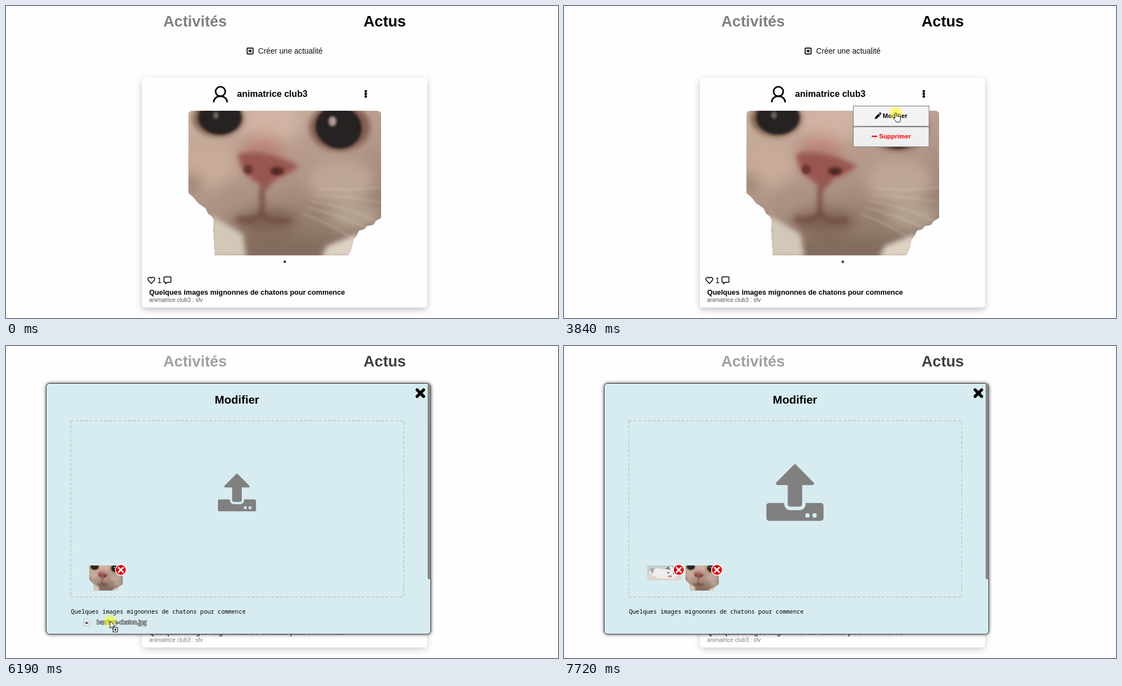
An HTML page for the animation above (8000 ms loop, 995 px wide and 563 px high).

```html
<!DOCTYPE html>
<html lang="fr">
<head>
<meta charset="utf-8">
<title>Actus</title>
<style>
html, body { margin: 0; width: 100%; height: 100%; overflow: hidden; background: #fefefe; }
svg { display: block; width: 100%; height: 100%; font-family: "Liberation Sans", Arial, sans-serif; }
.b { font-weight: bold; }
.line { fill: none; stroke: #000; }
.mono { font: 10.5px "Noto Sans Mono", monospace; }
.file { font: 10px "Open Sans", sans-serif; fill: #e8e8e8; stroke: #333; stroke-width: 1.6; paint-order: stroke; }
</style>
</head>
<body>
<svg viewBox="0 0 995 563">
<defs>
  <linearGradient id="skin" x1="0.1" y1="0" x2="0.55" y2="1">
    <stop offset="0" stop-color="#cbb09f"/><stop offset=".5" stop-color="#b2978a"/><stop offset="1" stop-color="#877163"/>
  </linearGradient>
  <clipPath id="fur"><path d="M0 148V8Q0 0 8 0H340Q348 0 348 8V193L338 199 333 206 322 208 317 214 308 216 303 226 298 232 294 250 288 261H48L45 215 46 197 42 190 36 186 31 176 18 167 10 157Z"/></clipPath>
  <filter id="soft" x="-40%" y="-40%" width="180%" height="180%"><feGaussianBlur stdDeviation="13"/></filter>
  <filter id="mid" x="-40%" y="-40%" width="180%" height="180%"><feGaussianBlur stdDeviation="5"/></filter>
  <filter id="fine" x="-40%" y="-40%" width="180%" height="180%"><feGaussianBlur stdDeviation="2.2"/></filter>
  <filter id="cardShade" x="-10%" y="-10%" width="120%" height="120%"><feDropShadow dx="0" dy="4" stdDeviation="6" flood-opacity=".24"/></filter>
  <filter id="boxShade" x="-5%" y="-5%" width="110%" height="110%"><feDropShadow dx="0" dy="0" stdDeviation="3" flood-opacity=".65"/></filter>

  <g id="cat" clip-path="url(#fur)">
    <rect width="348" height="261" fill="url(#skin)"/>
    <g filter="url(#soft)">
      <ellipse cx="150" cy="15" rx="52" ry="45" fill="#d0b3a3"/>
      <ellipse cx="40" cy="95" rx="48" ry="40" fill="#c8ab98"/>
      <ellipse cx="275" cy="125" rx="62" ry="40" fill="#bda597"/>
      <ellipse cx="85" cy="165" rx="34" ry="28" fill="#ab9180"/>
      <ellipse cx="300" cy="190" rx="50" ry="26" fill="#b3a192"/>
      <ellipse cx="135" cy="75" rx="40" ry="30" fill="#b98478"/>
      <ellipse cx="140" cy="200" rx="60" ry="22" fill="#7d5f53"/>
      <ellipse cx="160" cy="250" rx="85" ry="20" fill="#806b5c"/>
      <ellipse cx="5" cy="130" rx="16" ry="14" fill="#8d7466"/>
    </g>
    <g filter="url(#mid)">
      <path d="M40 188 60 200 98 222 105 265H40Z" fill="#d3c7b8"/>
      <path d="M250 244 305 222V265H240Z" fill="#ded2c2"/>
      <ellipse cx="54" cy="14" rx="46" ry="33" fill="#80614f"/>
      <ellipse cx="273" cy="30" rx="55" ry="43" fill="#835f51"/>
      <path d="M90 78Q135 66 200 100 180 116 160 122L140 143 116 124Q94 112 90 78Z" fill="#98564f"/>
      <path d="M133 138V188Q112 203 88 194M133 188Q155 206 184 196" fill="none" stroke="#714840" stroke-width="8"/>
    </g>
    <g filter="url(#fine)">
      <ellipse cx="57" cy="12" rx="39" ry="31" fill="#282323"/>
      <ellipse cx="271" cy="30" rx="42" ry="38" fill="#272323" transform="rotate(15 271 30)"/>
      <ellipse cx="50" cy="8" rx="4" ry="6" fill="#776862"/>
      <ellipse cx="260" cy="19" rx="6" ry="8" fill="#b59d94"/>
      <ellipse cx="108" cy="106" rx="8" ry="9" fill="#6c3430"/>
      <ellipse cx="160" cy="109" rx="13" ry="8" fill="#61302c"/>
      <ellipse cx="159" cy="110" rx="4" ry="3" fill="#292321"/>
    </g>
    <path d="M235 140Q290 145 348 138M225 153Q290 153 348 166M220 163Q285 172 340 200M215 174Q275 190 325 213M205 186Q260 205 300 234" fill="none" stroke="#ded0c2" stroke-width="2" opacity=".45" filter="url(#fine)"/>
  </g>

  <g id="kitten">
    <rect width="61" height="27" fill="#c5d0cd"/>
    <path d="M0 17Q20 10 61 18V27H0Z" fill="#ded5ce"/>
    <path d="M2 14Q14 1 29 7L34 3 52 2 56 15 48 24 20 23Z" fill="#f0eeec"/>
    <path d="M31 6 39 1 42 8ZM45 2 55 1 56 13Z" fill="#81848a"/>
    <path d="M5 6 14 4 9 16Z" fill="#a6aaae"/>
    <circle cx="38" cy="13" r="1.5" fill="#4a5a62"/><circle cx="48" cy="14" r="1.5" fill="#4a5a62"/>
    <path d="M35 20 43 17 45 22Z" fill="#bf8580"/>
  </g>

  <g id="del">
    <circle r="10.5" fill="#fff"/><circle r="9" fill="#e60000"/>
    <path d="M-4-4 4 4M4-4-4 4" stroke="#fff" stroke-width="3" stroke-linecap="round"/>
  </g>
</defs>

<rect width="995" height="563" fill="#fefefe"/>
<text class="b" x="283.5" y="36.7" font-size="27.5" fill="#808080">Activités</text>
<text class="b" x="644.5" y="36.7" font-size="27.5">Actus</text>
<g class="line" stroke-width="1.7"><rect x="434.6" y="75.8" width="10.8" height="10.8" rx="1"/><path d="M440 78.2v6M437 81.2h6"/></g>
<text x="454.5" y="86" font-size="13.75" fill="#111">Créer une actualité</text>

<rect x="245" y="129" width="514" height="415" rx="6" fill="#fefefe" filter="url(#cardShade)"/>
<g class="line" stroke-width="2.8"><circle cx="386.5" cy="154.3" r="8.7"/><path d="M374.3 173.8a12.2 11.2 0 0 1 24.4 0"/></g>
<text class="b" x="416.5" y="164" font-size="16.08">animatrice club3</text>
<g><circle cx="648.5" cy="153.8" r="2.3"/><circle cx="648.5" cy="158.6" r="2.3"/><circle cx="648.5" cy="163.4" r="2.3"/></g>
<use href="#cat" x="328.5" y="189"/>
<circle cx="502.5" cy="461.5" r="2.3" fill="#333"/>
<g class="line" stroke-width="1.5" stroke-linejoin="round">
  <path d="M262 500.8 256.7 495.3C253.5 491 259.5 487 262 491.2 264.5 487 270.5 491 267.3 495.3Z"/>
  <path d="M286 488.8h10.2q1.2 0 1.2 1.2v7.4q0 1.2-1.2 1.2h-5.4l-3.2 2.7v-2.7h-1.6q-1.3 0-1.3-1.2V490q0-1.2 1.3-1.2Z"/>
</g>
<text x="272.7" y="500" font-size="13.75">1</text>
<text class="b" x="258" y="520.5" font-size="12.87">Quelques images mignonnes de chatons pour commence</text>
<text x="258" y="533.5" font-size="10.3" fill="#555">animatrice club3 : sfv</text>

<g id="menu">
  <rect id="edit" x="521.5" y="180.5" width="136.5" height="36.5" fill="#efefef" stroke="#767676"/>
  <rect x="521.5" y="218" width="136.5" height="36" fill="#efefef" stroke="#767676"/>
  <path d="M560.3 204 561 200.3 567 194.3 570 197.3 564 203.3ZM567.8 193.5 569 192.3q.8-.6 1.6 0l1.2 1.2q.6.8 0 1.6L570.8 196.5Z"/>
  <text class="b" x="574.5" y="202.3" font-size="11.45">Modifier</text>
  <rect x="554.5" y="234" width="10.5" height="2.2" rx=".8" fill="#f00"/>
  <text class="b" x="568" y="239.3" font-size="11.45" fill="#f00">Supprimer</text>
</g>

<g id="modal">
  <rect width="995" height="563" fill="#fff" opacity=".25"/>
  <rect x="72.5" y="67.5" width="693" height="452.5" rx="6" fill="#d7ecf1" stroke="#333" filter="url(#boxShade)"/>
  <path d="M760 68h1q4 0 4.5 5V418q0 3-2.7 3t-2.8-3Z" fill="#888"/>
  <text class="b" x="376.3" y="103.6" font-size="20.6">Modifier</text>
  <path d="M741 79.2 752.8 91M752.8 79.2 741 91" stroke="#000" stroke-width="5.4" stroke-linecap="round"/>
  <rect x="116.8" y="134.8" width="600" height="318.4" fill="none" stroke="#bfcacd" stroke-width="1.7" stroke-dasharray="5.2 3.4"/>
  <g id="upload" fill="#808080">
    <rect x="-51.5" y="19.3" width="103" height="32.2" rx="4.8"/>
    <rect x="-19.3" y="0" width="38.6" height="32.2" rx="11" fill="#d7ecf1"/>
    <rect x="-13" y="-18" width="26" height="43.8" rx="4.8"/>
    <path d="M-31.2-16 0-47.5 31.2-16Z" stroke="#808080" stroke-width="6" stroke-linejoin="round"/>
    <g fill="#d7ecf1"><circle cx="22.5" cy="41.8" r="4"/><circle cx="35.4" cy="41.8" r="4"/></g>
  </g>
  <use id="added" href="#kitten" x="150" y="396"/>
  <g id="thumb"><use href="#cat" transform="translate(150 396) scale(.1745)"/></g>
  <use href="#del" x="207" y="404"/>
  <use id="del2" href="#del" x="275.7" y="404"/>
  <text class="mono" x="117" y="483">Quelques images mignonnes de chatons pour commence</text>
</g>

<g id="cursor">
  <g id="drag">
    <path d="M-46.5-4h6.5l2.5 2.5V8h-9Z" fill="#fff" stroke="#999" stroke-width=".8"/>
    <path d="M-44.5 5v-3l2-1.5 3 2V5Z" fill="#556"/>
    <text class="file" x="-24" y="6" opacity=".85">barriere-chaton.jpg</text>
  </g>
  <circle id="press" r="10.5" fill="#ff0" opacity=".53"/>
  <path id="arrow" d="M0 0V13l3-2.8 2.2 5 2.1-.9-2.2-5h4.2Z" fill="#fff" stroke="#000" stroke-width=".9"/>
  <g id="plus"><rect x="5.5" y="11.5" width="8" height="8" fill="#fff" stroke="#000"/><path d="M9.5 13.3v4.4M7.3 15.5h4.4" stroke="#000" stroke-width="1.2"/></g>
  <path id="hand" d="M-1.4 9.5V1.3a1.4 1.4 0 0 1 2.8 0V6Q3 5 4 6.3 5.5 5.5 6.3 7 8.2 6.4 8.5 8.3V12Q8.4 14 7.2 16.5H.6Q-.6 13.8-4 10 -4.4 8-2.8 8Z" fill="#fff" stroke="#000" stroke-width=".9"/>
</g>
</svg>
<script>
const LOOP = 8000;
const el = id => document.getElementById(id);
const show = (id, on) => el(id).setAttribute('visibility', on ? 'inherit' : 'hidden');
const clamp = v => Math.min(1, Math.max(0, v));
const linear = u => u;
const smooth = u => u * u * (3 - 2 * u);
const easeOut = u => 1 - (1 - u) ** 2;
const within = (t, a, b) => t >= a && t < b;

// start, end, easing, then start point, control point and end point
const moves = [
  [180, 1060, easeOut, 895, 537, 780, 330, 644, 174],
  [1270, 1610, smooth, 644, 174, 646, 168, 647, 161],
  [2360, 2900, smooth, 647, 161, 630, 190, 598, 193],
  [4560, 4960, linear, 598, 193, 950, 200, 154, 490],
  [6190, 6530, linear, 187, 497, 285, 398, 388, 307],
  [6600, 6840, easeOut, 388, 307, 420, 265, 426, 200],
  [7320, 7700, smooth, 426, 200, 680, 200, 26, 498]
];

function cursorAt(t) {
  const m = moves.filter(m => t >= m[0]).pop() || moves[0];
  const [a, b, ease, x0, y0, cx, cy, x1, y1] = m;
  const u = ease(clamp((t - a) / (b - a))), v = 1 - u;
  const mix = (p, c, q) => v * v * p + 2 * u * v * c + u * u * q;
  return [mix(x0, cx, x1), mix(y0, cy, y1)];
}

function draw(t) {
  const [x, y] = cursorAt(t);
  const dragging = within(t, 6190, 6910);
  const isHand = within(t, 1000, 4960) || within(t, 6910, 7720);
  const added = t >= 6910;

  show('menu', within(t, 2160, 4100));
  const active = t >= 3840, hover = y > 181;
  el('edit').setAttribute('fill', active ? '#f3f3f3' : hover ? '#e5e5e5' : '#efefef');

  show('modal', t >= 4100);
  const shrink = smooth(clamp((t - 4880) / 300)), grow = smooth(clamp((t - 6240) / 320));
  const size = 1 - (shrink - grow) / 3;
  el('upload').setAttribute('transform', `translate(416.3 264) scale(${size})`);
  show('added', added);
  show('del2', added);
  el('thumb').setAttribute('transform', `translate(${added ? 68.7 : 0} 0)`);

  show('cursor', within(t, 240, 4960) || within(t, 6190, 7720));
  el('cursor').setAttribute('transform', `translate(${x} ${y})`);
  show('press', within(t, 1960, 2160) || within(t, 3840, 4100) || dragging);
  show('hand', isHand);
  show('arrow', !isHand);
  show('drag', dragging);
  show('plus', dragging);
}

const start = performance.now();
function tick() {
  draw((performance.now() - start) % LOOP);
  requestAnimationFrame(tick);
}
tick();
</script>
</body>
</html>
```
